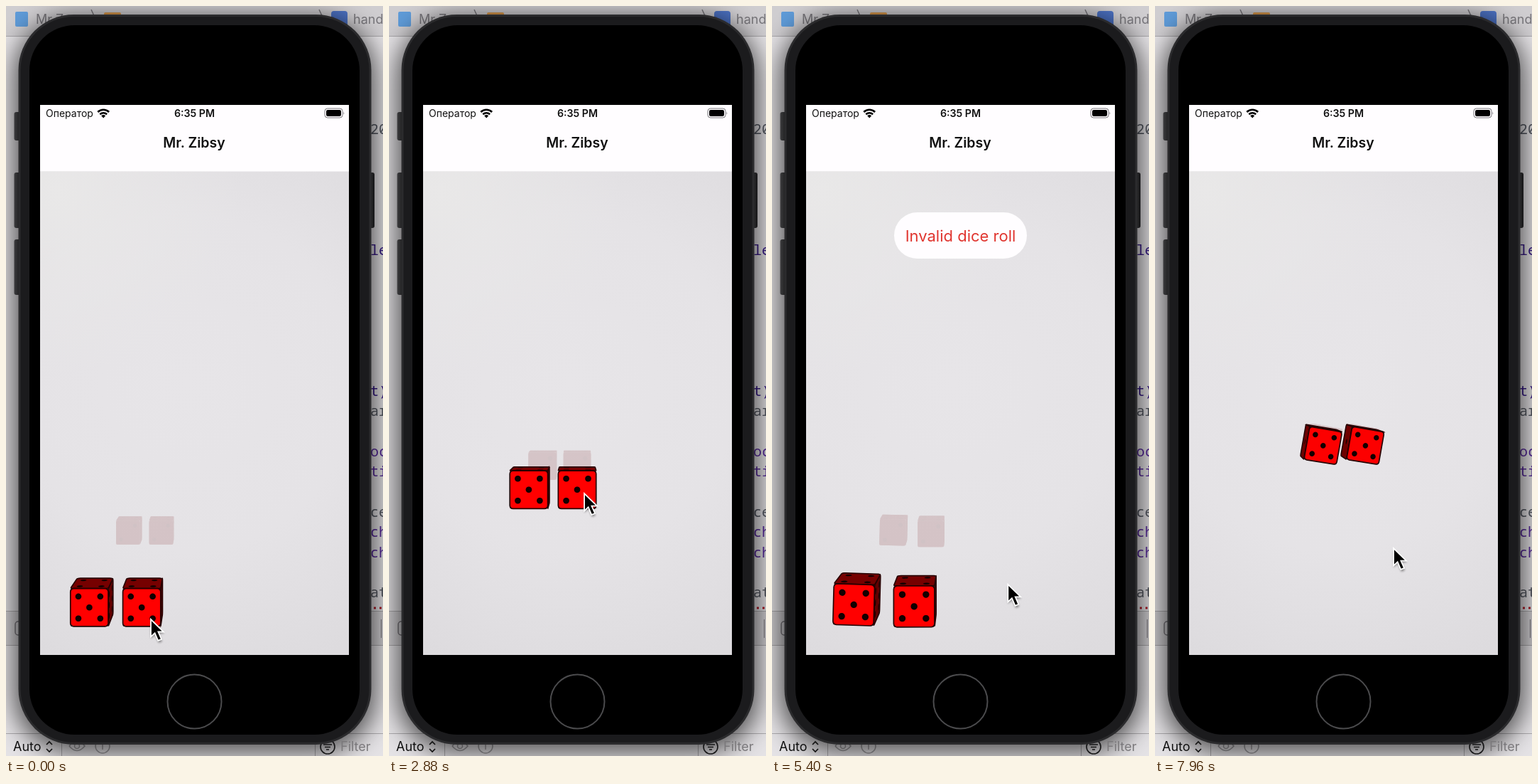
These frames come from a looping animation (531 by 1054 pixels, 8000 ms). An HTML page:

```html
<!DOCTYPE html>
<html lang="en">
<head>
<meta charset="utf-8">
<title>Dice roll</title>
<style>
html, body { margin: 0; width: 100%; height: 100%; overflow: hidden; background: #d5d3d6; }
svg { display: block; width: 531px; height: 1054px; }
text { font-family: Inter, "Open Sans", sans-serif; white-space: pre; }
.code text { font-family: "Noto Sans Mono", "DejaVu Sans Mono", monospace; font-size: 20px; }
</style>
</head>
<body>
<svg viewBox="0 0 531 1054" xmlns="http://www.w3.org/2000/svg">
  <defs>
    <filter id="soft" x="-30%" y="-20%" width="160%" height="140%"><feGaussianBlur stdDeviation="17"/></filter>
    <filter id="small" x="-50%" y="-50%" width="200%" height="200%"><feGaussianBlur stdDeviation="1.6"/></filter>
    <radialGradient id="floor" gradientUnits="userSpaceOnUse" cx="255" cy="530" r="430">
      <stop offset="0" stop-color="#e7e5e8"/><stop offset=".55" stop-color="#e5e3e6"/><stop offset="1" stop-color="#dddbde"/>
    </radialGradient>
    <radialGradient id="glow" gradientUnits="userSpaceOnUse" cx="70" cy="260" r="260">
      <stop offset="0" stop-color="#e9e8e8"/><stop offset="1" stop-color="#e9e8e8" stop-opacity="0"/>
    </radialGradient>
    <linearGradient id="button"><stop offset="0" stop-color="#3c3c3e"/><stop offset="1" stop-color="#161617"/></linearGradient>
  </defs>

  <!-- editor behind the phone -->
  <rect width="531" height="1054" fill="#e4e2e5"/>
  <rect width="531" height="42" fill="#cfcdd0"/>
  <rect y="850" width="531" height="48" fill="#d3d1d4"/>
  <path d="M0 42.5H531M0 850.5H531M0 898.5H531M0 1022.5H531M78.5 1022V1054M435.5 1022V1054" stroke="#a9a7aa" fill="none"/>
  <rect x="13" y="8" width="18" height="21" rx="2" fill="#5f9bd8"/>
  <text x="42" y="25" font-size="18" fill="#77757a">Mr Z</text>
  <rect x="138" y="9" width="24" height="18" rx="2" fill="#d9984a"/>
  <path d="M120 5l6 13-6 13M441 5l6 13-6 13" fill="none" stroke="#77757a" stroke-width="1.5"/>
  <rect x="458" y="7" width="23" height="23" rx="4" fill="#4c72c4"/>
  <text x="489" y="25" font-size="18" fill="#77757a">hand</text>
  <g class="code" fill="#555962">
    <text x="513" y="180">20</text>
    <text x="513" y="350" fill="#371a86">le</text>
    <text x="513" y="548" fill="#371a86">t)</text>
    <text x="513" y="576">ar</text>
    <text x="513" y="633" fill="#582a9c">oc</text>
    <text x="513" y="661" fill="#582a9c">ti</text>
    <text x="513" y="718">ce</text>
    <text x="513" y="746" fill="#582a9c">ch</text>
    <text x="513" y="775" fill="#582a9c">ch</text>
    <text x="513" y="831">at</text>
  </g>
  <path d="M518 846h3M526 846h3" stroke="#b0202c" stroke-width="3"/>
  <rect x="13" y="865" width="20" height="19" rx="4" fill="none" stroke="#77757a" stroke-width="1.5"/>
  <path d="M528.5 862V888" stroke="#77757a"/>
  <g fill="none" stroke="#9a989b" stroke-width="1.5">
    <path d="M89 1040q11-13 22 0q-11 13-22 0"/><circle cx="100" cy="1040" r="3.5"/>
    <circle cx="136" cy="1040" r="10"/><path d="M136 1038v7M136 1034v2"/>
  </g>

  <rect x="10" y="15" width="512" height="1035" rx="84" opacity=".62" filter="url(#soft)"/>

  <text x="10" y="1047" font-size="18" fill="#111">Auto</text>
  <path d="M57 1038l4-4 4 4M57 1044l4 4 4-4" fill="none" stroke="#111" stroke-width="1.7"/>
  <circle cx="453" cy="1041" r="10" fill="none" stroke="#161617" stroke-width="1.6"/>
  <path d="M447 1038h12M449 1041.500h8M451 1045h4" stroke="#161617" stroke-width="1.6"/>
  <text x="471" y="1047" font-size="18" fill="#7a787b">Filter</text>

  <!-- phone -->
  <g fill="url(#button)">
    <rect x="11.500" y="149" width="10" height="40" rx="3"/>
    <rect x="11.500" y="234" width="10" height="78" rx="3"/>
    <rect x="11.500" y="328" width="10" height="78" rx="3"/>
    <rect x="509" y="234" width="10" height="78" rx="3"/>
  </g>
  <rect x="17.500" y="12" width="497" height="1026" rx="78" fill="#2b2b2d"/>
  <rect x="20.500" y="15" width="491" height="1020" rx="75" fill="#1b1b1d"/>
  <rect x="33" y="27" width="465" height="997" rx="64" fill="#000"/>
  <circle cx="265.500" cy="977.500" r="38" fill="none" stroke="#4b4b4d" stroke-width="2"/>

  <rect x="48" y="139" width="435" height="94" fill="#fffdff"/>
  <rect x="48" y="232.500" width="435" height="679.500" fill="url(#floor)"/>
  <rect x="48" y="232.500" width="435" height="300" fill="url(#glow)"/>
  <text x="56" y="156" font-size="14" fill="#111">Оператор</text>
  <g fill="none" stroke="#000" stroke-width="2.600">
    <path d="M129.300 149a11.200 11.200 0 0 1 15.800 0M132.300 152.300a7 7 0 0 1 9.800 0"/>
  </g>
  <path d="M137.200 157.500l-3-3.200a4.500 4.500 0 0 1 6 0z"/>
  <text x="265.500" y="156" font-size="14.200" font-weight="600" text-anchor="middle" fill="#111">6:35 PM</text>
  <rect x="449" y="144" width="25" height="13" rx="3.800" fill="none" stroke="#77757a"/>
  <rect x="451" y="146" width="21" height="9" rx="2.200"/>
  <path d="M475.500 148.500q1.500 2 0 4z" fill="#77757a"/>
  <text x="265" y="199" font-size="19.500" font-weight="600" text-anchor="middle" fill="#111">Mr. Zibsy</text>

  <g id="pill">
    <rect x="172" y="290" width="187" height="65" rx="32.500" fill="#fffdff"/>
    <text x="265.500" y="331" font-size="22" text-anchor="middle" fill="#e0352f">Invalid dice roll</text>
  </g>
  <g id="mirror" opacity=".18"></g>
  <g id="dice"></g>
  <g id="touch">
    <circle id="disc" r="24" fill="#c9c5c7" opacity=".78"/>
    <g id="ring" fill="none">
      <circle r="36" stroke="#fff" stroke-width="4.500" opacity=".8"/>
      <circle r="35.500" stroke="#000" stroke-width="2.400"/>
    </g>
  </g>
  <g id="cursor">
    <path d="M0 2V27l6-5 5 11 5-2-5-11h8z" opacity=".4" filter="url(#small)"/>
    <path d="M0 0V24.500l5.600-5.200 4.600 10.600 4.800-2-4.600-10.400h7.600z" fill="#000" stroke="#fff" stroke-width="1.800"/>
  </g>
</svg>
<script>
const LOOP = 8000, SIZE = 58, HALF = SIZE / 2;
const VX = 265, VY = 560, DEPTH = 900, FLOOR = 293;
const RELEASES = [2760, 7560], BACK = 5000, HOME = 5450;
const $ = id => document.getElementById(id);
const clamp = (v, a = 0, b = 1) => Math.min(b, Math.max(a, v));
const ease = v => { v = clamp(v); return v * v * (3 - 2 * v); };

// Keys are [time, ...values]
const held = [[0, -74, 286], [560, -74, 286], [1280, 2, 133], [1640, 16, 30], [2080, -55, -16],
  [2200, -54, -14], [2760, -4, 118], [2880, 0, 130]];
const again = [[HOME, -74, 286], [6420, -74, 286], [6900, 20, 110], [7250, 36, 40],
  [7560, 34, 66], [7700, 34, 71], [LOOP, 34, 71]];
const left = keys => keys.map(([t, x, y]) => [t, x - 74, y]);
const paths = [
  [...left(held), [2968, -78, 142], [3300, -190, 190], [3450, -232, 202], [3800, -226, 215],
    [4000, -224, 217], [BACK, -224, 217], ...left(again)],
  [...held, [2968, 8, 142], [3300, 110, 210], [3700, 180, 290], [4000, 188, 306],
    [BACK, 188, 306], ...again]
];
const lastTurn = [[HOME, 0, 0, 0], [7740, 0, 0, 0], [7960, 0, -10, 10], [LOOP, 0, -12, 11]];
const turns = [
  [[0, 0, 0, 0], [2960, 0, 0, 0], [3350, -180, 200, 20], [3700, -330, 400, 40], [4000, -360, 450, 45],
    [BACK, -360, 450, 45], [BACK + .1, 0, 90, 45], ...lastTurn],
  [[0, 0, 0, 0], [2960, 0, 0, 0], [3350, -220, 160, -10], [3700, -410, 320, -6], [4000, -450, 360, -3],
    [BACK, -450, 360, -3], [BACK + .1, -90, 0, -3], ...lastTurn]
];
const pointer = [[0, 205, 863], [300, 203, 861], [500, 194, 848], [1280, 281, 665], [1560, 288, 590],
  [1960, 212, 548], [2120, 210, 547], [2640, 262, 672], [2880, 276, 686], [3400, 330, 760],
  [4000, 370, 800], [5200, 371, 801], [5800, 222, 850], [6200, 216, 848], [6400, 200, 848],
  [6800, 282, 680], [7200, 302, 600], [7560, 299, 628], [7700, 312, 680], [7960, 337, 763], [LOOP, 337, 764]];

// Smooth interpolation that never overshoots its keys
function track(keys, t) {
  let i = 0;
  while (i < keys.length - 2 && t >= keys[i + 1][0]) i++;
  const slope = (j, k) => j < 0 || j > keys.length - 2 ? 0
    : (keys[j + 1][k] - keys[j][k]) / (keys[j + 1][0] - keys[j][0]);
  const tangent = (j, k) => {
    const a = slope(j - 1, k), b = slope(j, k);
    return a * b > 0 ? 2 * a * b / (a + b) : 0;
  };
  const p = keys[i], q = keys[i + 1], d = q[0] - p[0], u = clamp((t - p[0]) / d);
  return p.slice(1).map((v, n) => {
    const k = n + 1, e = u * u * (3 - 2 * u);
    return v + (q[k] - v) * e + d * u * (1 - u) * ((1 - u) * tangent(i, k) - u * tangent(i + 1, k));
  });
}

// Gap between die and floor after letting go
function height(t) {
  const top = FLOOR - SIZE, start = t >= RELEASES[1] ? RELEASES[1] : RELEASES[0];
  if (t < RELEASES[0] || (t >= HOME && t < RELEASES[1])) return top;
  if (t >= BACK && t < HOME) return top * ease((t - BACK) / (HOME - BACK));
  let s = t - start;
  if (s < 210) return top * (1 - (s / 210) ** 2);
  s -= 210;
  for (const [time, h] of [[220, 30], [130, 9]]) {
    if (s < time) return 4 * h * s / time * (1 - s / time);
    s -= time;
  }
  return 0;
}

function rotation([a, b, c]) {
  const [A, B, C] = [a, b, c].map(v => v * Math.PI / 180);
  return ([x, y, z]) => {
    [x, z] = [x * Math.cos(B) + z * Math.sin(B), z * Math.cos(B) - x * Math.sin(B)];
    [y, z] = [y * Math.cos(A) - z * Math.sin(A), y * Math.sin(A) + z * Math.cos(A)];
    return [x * Math.cos(C) - y * Math.sin(C), x * Math.sin(C) + y * Math.cos(C), z];
  };
}

const P = .58;
const pips = {
  1: [[0, 0]],
  2: [[-P, P], [P, -P]],
  3: [[-P, P], [0, 0], [P, -P]],
  4: [[-P, -P], [P, -P], [-P, P], [P, P]],
  6: [-P, 0, P].flatMap(v => [[-P, v], [P, v]])
};
pips[5] = [...pips[4], [0, 0]];
// value, normal, u axis, v axis
const X = [1, 0, 0], Y = [0, 1, 0], Z = [0, 0, 1], neg = v => v.map(n => -n);
const faces = [[5, neg(Z), X, Y], [2, Z, X, Y], [4, neg(Y), X, Z], [3, Y, X, Z], [6, X, Z, Y], [1, neg(X), Z, Y]];

function arc(cx, cy, r, from, to, steps) {
  return Array.from({ length: steps + 1 }, (_, i) => {
    const w = from + (to - from) * i / steps;
    return [cx + r * Math.cos(w), cy + r * Math.sin(w)];
  });
}
const rounded = r => [[1, 1], [-1, 1], [-1, -1], [1, -1]].flatMap(([x, y], i) =>
  arc(x * (1 - r), y * (1 - r), r, i * Math.PI / 2, (i + 1) * Math.PI / 2, 4));
const outline = rounded(.17), core = rounded(.07);

function drawDie(centre, turn, scale, mirrored) {
  const place = p => {
    const [x, y, z] = turn(p).map((v, i) => v * HALF * scale + centre[i]);
    return [x, y, mirrored ? 2 * FLOOR - z : z];
  };
  const shape = (pts, n, u, v) => 'M' + pts.map(([a, b]) => {
    const [x, y, z] = place(n.map((c, i) => c + a * u[i] + b * v[i]));
    const s = DEPTH / (DEPTH + z);
    return (VX + x * s).toFixed(2) + ' ' + (VY + y * s).toFixed(2);
  }).join('L') + 'Z';
  let under = '', over = '';
  const seen = faces.map(f => {
    const normal = turn(f[1]), at = place(f[1]);
    if (mirrored) normal[2] *= -1;
    const facing = normal[0] * at[0] + normal[1] * at[1] + normal[2] * (at[2] + DEPTH);
    return { f, normal, facing };
  }).filter(s => s.facing < 0).sort((a, b) => b.facing - a.facing);
  for (const { f: [value, n, u, v], normal } of seen) {
    const glow = clamp(-normal[2]) ** 1.5;
    const red = Math.round(118 + 137 * glow - 20 * Math.abs(normal[0]) * (1 - glow));
    const fill = mirrored ? '#8a3a3a' : `rgb(${red},0,0)`;
    const edge = mirrored ? '' : ' stroke="#260000" stroke-width="1.7"';
    under += `<path d="${shape(core, n, u, v)}" fill="${mirrored ? '#8a3a3a' : '#2c0000'}"/>`;
    over += `<path d="${shape(outline, n, u, v)}" fill="${fill}"${edge}/>`;
    const dots = pips[value].map(([a, b]) => shape(arc(a, b, .165, 0, 2 * Math.PI, 14), n, u, v)).join('');
    over += `<path d="${dots}" fill="${mirrored ? '#743434' : '#120000'}"/>`;
  }
  return under + over;
}

const move = (el, x, y) => el.setAttribute('transform', `translate(${x.toFixed(2)} ${y.toFixed(2)})`);

function render(t) {
  const grabbed = (t >= 520 && t < RELEASES[0]) || (t >= 6400 && t < RELEASES[1]);
  const idle = t < 3000 ? 1 - ease((t - 500) / 120) : ease((t - HOME) / 200) * (1 - ease((t - 6380) / 120));
  const scale = 1 - idle * .04 * (1 + Math.cos(2 * Math.PI * t / 827));
  const gap = height(t);
  let mirror = '', dice = '';
  paths.forEach((path, i) => {
    const [x, y] = track(path, t), turn = rotation(track(turns[i], t));
    const reach = HALF * [X, Y, Z].reduce((sum, axis) => sum + Math.abs(turn(axis)[2]), 0);
    const centre = [x, y, FLOOR - gap - reach];
    mirror += drawDie(centre, turn, scale, true);
    dice += drawDie(centre, turn, scale, false);
  });
  $('mirror').innerHTML = mirror;
  $('dice').innerHTML = dice;

  const [cx, cy] = track(pointer, t), [dx, dy] = track(paths[1], t);
  move($('cursor'), cx - 1, cy - 1);
  move($('ring'), cx - 1, cy + 1);
  move($('disc'), (cx + dx + VX) / 2, (cy + dy + VY) / 2);
  $('touch').style.display = grabbed ? '' : 'none';
  $('pill').style.opacity = ease((t - BACK) / 200) * (1 - ease((t - 6700) / 200));
}

const begin = performance.now();
function frame() {
  render((performance.now() - begin) % LOOP);
  requestAnimationFrame(frame);
}
render(0);
requestAnimationFrame(frame);
</script>
</body>
</html>
```
